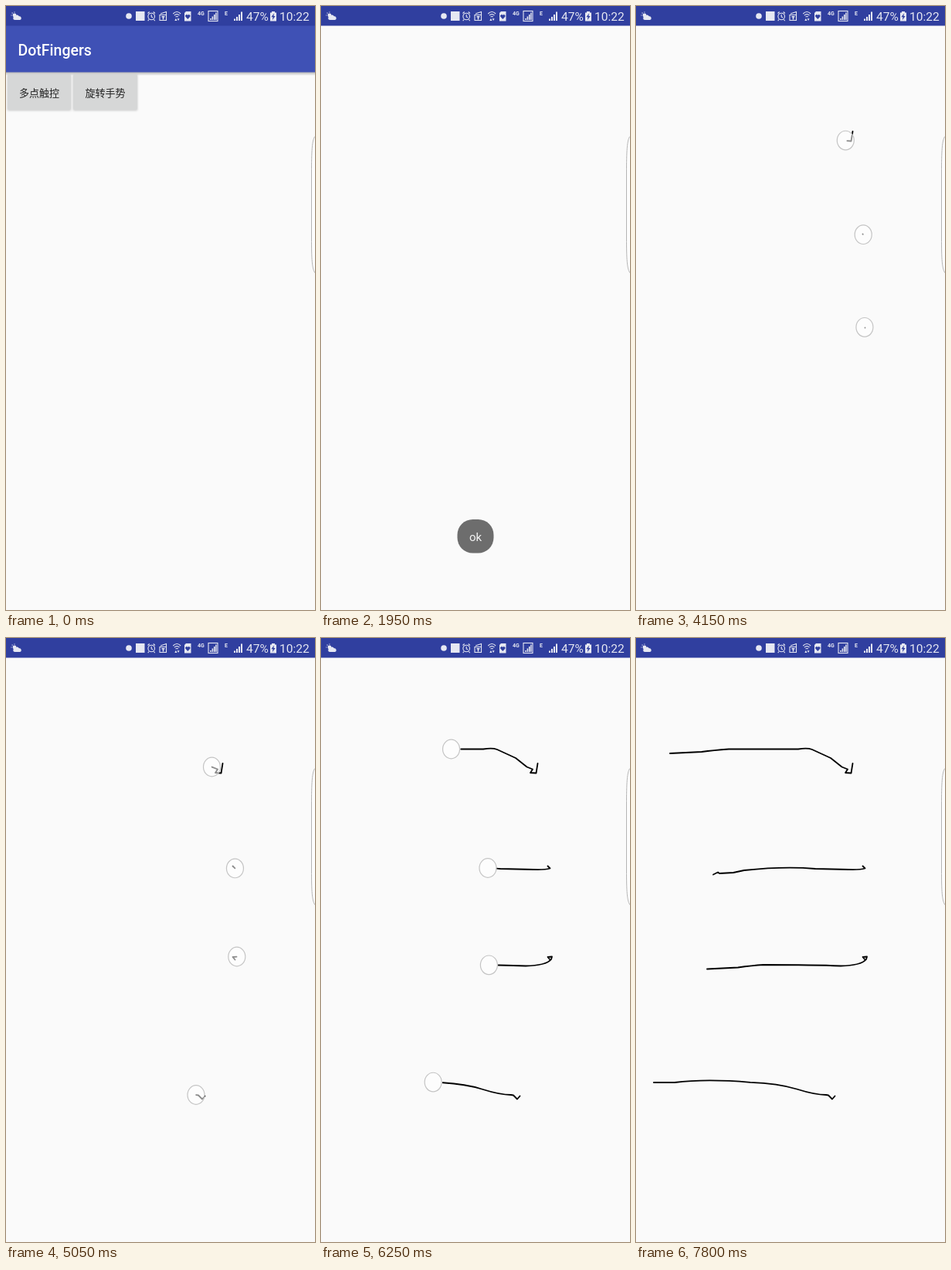
These frames come from a looping animation (400 px wide and 780 px high, 8000 ms). An HTML page:

```html
<!DOCTYPE html>
<html lang="zh-CN">
<head>
<meta charset="utf-8">
<title>Touch trails</title>
<style>
  html, body { margin: 0; width: 100%; height: 100%; overflow: hidden; background: #fafafa; }
  svg { display: block; width: 400px; height: 780px; }
  text { font-family: Roboto, "Noto Sans", sans-serif; }
  .label { font: 500 13px "Noto Sans CJK SC", "Noto Sans CJK", sans-serif; fill: #222; text-anchor: middle; }
  .small { font-size: 7px; font-weight: 700; }
  .status { fill: #e6e8f2; }
  .line { fill: none; stroke: #e6e8f2; stroke-width: 1.1; }
  .dark { fill: #303f9f; }
  .pointer { fill: #fff; fill-opacity: .55; stroke: #c4c4c4; stroke-width: 1.2; }
  .trail { fill: none; stroke: #000; stroke-width: 1.8; stroke-linecap: round; stroke-linejoin: round; }
  .lift, .tap, .page, .toast { animation: 8s linear infinite; }
  .lift { animation-name: lift; }
  .tap { animation-name: tap; }
  .page { animation-name: page; }
  .toast { animation-name: toast; }
  @keyframes lift {
    0%, 14.375% { opacity: 0; }
    16%, 18% { opacity: 1; }
    20%, 100% { opacity: 0; }
  }
  @keyframes tap {
    0%, 14.37% { opacity: 0; }
    14.375%, 17.5% { opacity: 1; }
    17.51%, 100% { opacity: 0; }
  }
  @keyframes page {
    0%, 18.125% { opacity: 0; transform: translateY(62px); animation-timing-function: ease-out; }
    20.625% { opacity: 1; transform: translateY(10px); animation-timing-function: ease-out; }
    22.5%, 100% { opacity: 1; transform: none; }
  }
  @keyframes toast {
    0%, 18.75% { opacity: 0; animation-timing-function: ease-out; }
    24.375% { opacity: 1; }
    38.75% { opacity: 1; animation-timing-function: ease-in; }
    45%, 100% { opacity: 0; }
  }
</style>
</head>
<body>
<svg viewBox="0 0 400 780">
  <defs>
    <linearGradient id="shade" x2="0" y2="1">
      <stop stop-opacity=".3"/>
      <stop offset="1" stop-opacity="0"/>
    </linearGradient>
    <filter id="soft" x="-20%" y="-30%" width="140%" height="160%"><feGaussianBlur stdDeviation="1.6"/></filter>
  </defs>
  <rect width="400" height="780" fill="#fafafa"/>

  <rect y="85" width="400" height="5" fill="url(#shade)"/>
  <rect y="25" width="400" height="60.5" fill="#3f51b5"/>
  <text x="15.5" y="63.5" font-size="19.5" font-weight="500" fill="#fff">DotFingers</text>
  <g opacity=".2" filter="url(#soft)">
    <rect x="2" y="89" width="82" height="46"/>
    <rect x="87" y="89" width="83" height="46"/>
  </g>
  <rect class="lift" x="2" y="91" width="82" height="45" fill-opacity=".2" filter="url(#soft)"/>
  <g fill="#d6d7d7">
    <rect x="2" y="88" width="82" height="46" rx="2"/>
    <rect x="87" y="88" width="83" height="46" rx="2"/>
  </g>
  <text class="label" x="43" y="116.5">多点触控</text>
  <text class="label" x="128.5" y="116.5">旋转手势</text>

  <rect class="page" y="25" width="400" height="755" fill="#fafafa"/>

  <g class="toast">
    <rect x="176.5" y="663" width="47" height="43.5" rx="20" fill="#6d6d6d"/>
    <text x="200" y="690.5" font-size="15" fill="#f4f4f4" text-anchor="middle">ok</text>
  </g>

  <path d="M400.5 168C396 171 395.5 190 395.5 215V300C395.5 325 396 341 400.5 345" fill="#fdfdfd" stroke="#b4b4b4"/>
  <g id="fingers"></g>
  <ellipse class="pointer tap" cx="30" cy="112" rx="11" ry="12.3"/>

  <rect class="dark" width="400" height="25.5"/>
  <g class="status">
    <!-- weather -->
    <circle cx="11" cy="12" r="2.4"/>
    <path class="line" d="M7.5 12h-1M8.5 9.5l-.8-.8M11 8.6v-1"/>
    <path d="M11.5 18a2.3 2.3 0 0 1 0-4.6a3 3 0 0 1 5.4-.2a2.4 2.4 0 0 1 .8 4.8z"/>
    <!-- connections -->
    <circle cx="159" cy="13" r="3.8"/>
    <rect x="168" y="7" width="11.5" height="12"/>
    <!-- alarm -->
    <circle class="line" cx="188.2" cy="13.5" r="4.3"/>
    <path class="line" d="M188.2 11v3l2 1M183.5 9.5l2.2-2M192.9 9.5l-2.2-2M185 17.5l-1.3 1.7M191.4 17.5l1.3 1.7"/>
    <!-- bag -->
    <path class="line" d="M199 11.5v7h8.5v-7zM200 10l7.5-2.5v4"/>
    <path d="M201.5 13h4v1.5h-1.2v3h-1.6v-3h-1.2z"/>
    <!-- wireless -->
    <path class="line" d="M216.3 10q4.9-5 9.8 0M217.9 12.2q3.3-3.2 6.6 0M219.5 14.2q1.7-1.5 3.4 0"/>
    <path d="M218.3 19l1.6-3 1.6 3zM221.6 16.2h3l-1.5 2.8z"/>
    <!-- heart card -->
    <path d="M231 9l2-2h6.5v12.5h-8.5z"/>
    <path class="dark" d="M235.3 17l-3-3.2a1.7 1.7 0 0 1 3-1.8a1.7 1.7 0 0 1 3 1.8z"/>
    <text class="small" x="248" y="12">4G</text>
    <rect class="line" x="262" y="6.5" width="12" height="13"/>
    <path d="M264.2 16h1.6v2h-1.6zM266.6 13.5h1.6v4.5h-1.6zM269 11h1.6v7h-1.6zM271.2 8.5h1.4v9.5h-1.4z"/>
    <text class="small" x="283" y="12">E</text>
    <path d="M295 16.5h2v2.5h-2zM298 14h2v5h-2zM301 11h2v8h-2zM304 7.5h2v11.5h-2z"/>
    <text x="311" y="19" font-size="15.5">47%</text>
    <path d="M342 8.5h2v-1.5h4v1.5h2v11h-8z"/>
    <path class="dark" d="M347 9.5l-3.6 4.8h2.2l-.8 4 3.8-5.2h-2.2z"/>
    <text x="354" y="19" font-size="15.5">10:22</text>
  </g>
</svg>
<script>
  const LOOP = 8000, STEP = 50, LAG = 95, END = 7600, LIFT = 7700;
  const NS = 'http://www.w3.org/2000/svg';
  const layer = document.getElementById('fingers');

  // each finger wobbles along its hook after landing, then sweeps left
  const fingers = [
    {
      land: 3600, go: 5050,
      hook: 'M280.5 162L278.5 174.5 271 174 274 169.5 266.5 166.5',
      sweep: 'L252 155 228 144Q222 141.5 210 143.5H120Q100 145 85 147L44 149'
    },
    {
      land: 4000, go: 5200,
      hook: 'M293.5 294.5L296.5 297.5',
      sweep: 'Q290 299.5 275 299L232 298Q192 294.5 140 300L126 303 108 304 106 302.5 100 305.5'
    },
    {
      land: 4100, go: 5200,
      hook: 'M296.5 415.5L293.5 412 299 411.5',
      sweep: 'L298 415Q291 423 265 423.5Q232 422 165 422Q150 423 132 425.5L92 427.5'
    },
    {
      land: 4200, go: 5050,
      hook: 'M257.5 591.5L254 595.5 249 590.5 246 590',
      sweep: 'Q232 590 208 582.5T148 573.8Q90 569 50 574H23'
    }
  ];

  const progress = (t, from, to) => Math.min(1, Math.max(0, (t - from) / (to - from)));
  const easeOut = x => x * (2 - x);
  const easeInOut = x => x * x * (3 - 2 * x);

  function add(tag, attrs) {
    const el = document.createElementNS(NS, tag);
    for (const name in attrs) el.setAttribute(name, attrs[name]);
    return layer.appendChild(el);
  }

  function setup(f) {
    f.trail = add('path', { class: 'trail', d: f.hook });
    f.hookLength = f.trail.getTotalLength();
    f.trail.setAttribute('d', f.hook + f.sweep);
    f.sweepLength = f.trail.getTotalLength() - f.hookLength;
    f.dot = add('ellipse', { class: 'pointer', rx: 11, ry: 12.3 });
  }

  function travelled(f, t) {
    return f.hookLength * easeOut(progress(t, f.land, f.go))
      + f.sweepLength * easeInOut(progress(t, f.go, END));
  }

  function show(el, on) {
    el.style.visibility = on ? 'visible' : 'hidden';
  }

  function draw(f, t) {
    show(f.trail, t >= f.land);
    show(f.dot, t >= f.land && t < LIFT);
    f.trail.style.strokeDasharray = travelled(f, t - LAG) + ' 999';
    const p = f.trail.getPointAtLength(travelled(f, t));
    f.dot.setAttribute('cx', p.x);
    f.dot.setAttribute('cy', p.y);
  }

  function frame() {
    const t = Math.floor(performance.now() % LOOP / STEP) * STEP;
    for (const f of fingers) draw(f, t);
    requestAnimationFrame(frame);
  }

  fingers.forEach(setup);
  frame();
</script>
</body>
</html>
```
